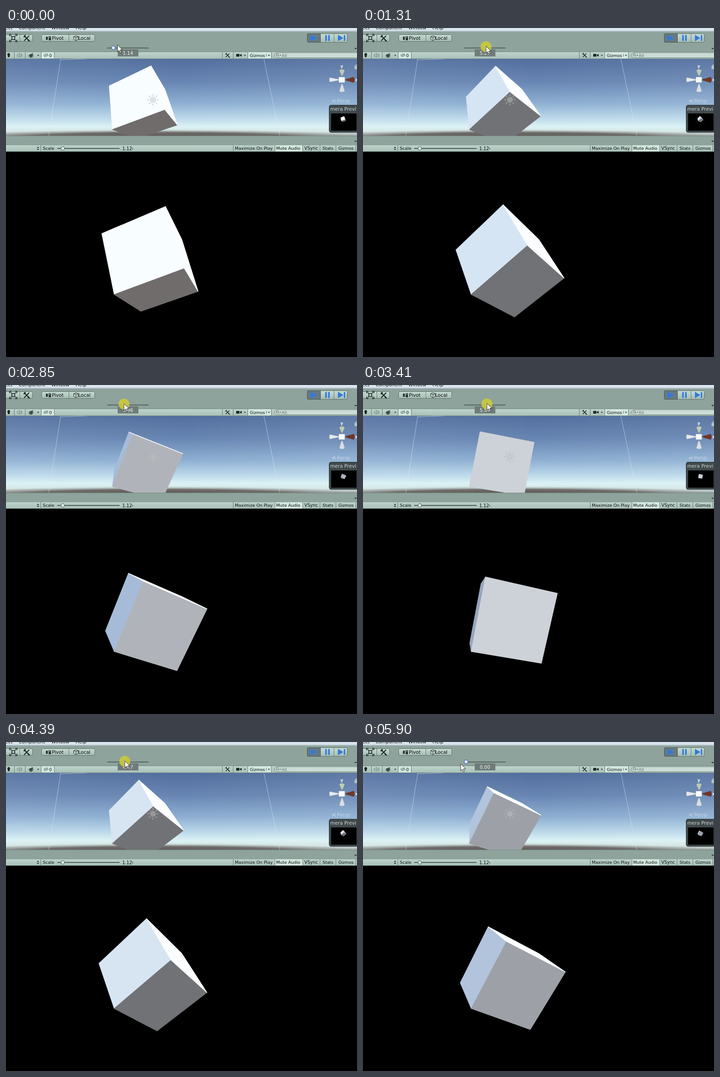
Write an HTML page that moves like this. It is 773 px wide and 724 px high and loops after 5.98 s.

```html
<!DOCTYPE html>
<html lang="en">
<head>
<meta charset="utf-8">
<title>Rotating cube in an editor</title>
<style>
html, body { margin: 0; width: 100%; height: 100%; overflow: hidden; background: #000; }
svg { display: block; width: 773px; height: 724px; }
text { font-family: "DejaVu Sans", Verdana, sans-serif; font-size: 9.4px; fill: #0b0f0e; }
.mid { font-size: 10.6px; }
.sep { stroke: #65776f; stroke-width: 1; fill: none; }
.edge { stroke: #65776f; stroke-opacity: .55; fill: none; }
.btn { fill: url(#button); stroke: #5d6f67; }
.lit { fill: #d3e8df; }
.ray { fill: #b9bbbb; }
polygon { stroke-width: 1.3; stroke-linejoin: round; }
</style>
</head>
<body>
<svg viewBox="0 0 773 724">
  <defs>
    <linearGradient id="button" x2="0" y2="1">
      <stop offset="0" stop-color="#c5dbd2"/><stop offset="1" stop-color="#a5bcb3"/>
    </linearGradient>
    <linearGradient id="strip" x2="0" y2="1">
      <stop offset="0" stop-color="#bdd4cb"/><stop offset="1" stop-color="#a8c0b7"/>
    </linearGradient>
    <linearGradient id="sky" x2="0" y2="1">
      <stop offset="0" stop-color="#526e9d"/><stop offset=".3" stop-color="#6886b3"/>
      <stop offset=".58" stop-color="#8fb0d3"/><stop offset=".76" stop-color="#b9d6e8"/>
      <stop offset=".88" stop-color="#dbf2f5"/><stop offset=".95" stop-color="#d5e5e4"/>
      <stop offset="1" stop-color="#9da5a3"/>
    </linearGradient>
    <linearGradient id="haze">
      <stop offset="0" stop-color="#e4f2f8" stop-opacity=".08"/>
      <stop offset=".5" stop-color="#e4f2f8" stop-opacity="0"/>
      <stop offset="1" stop-color="#e4f2f8" stop-opacity=".08"/>
    </linearGradient>
    <radialGradient id="ground">
      <stop offset="0" stop-color="#5d5755"/><stop offset=".6" stop-color="#6f6b69"/>
      <stop offset="1" stop-color="#a9b3b2" stop-opacity="0"/>
    </radialGradient>
    <clipPath id="sceneClip"><rect y="68" width="773" height="169"/></clipPath>
  </defs>

  <!-- menu and main toolbar -->
  <rect width="773" height="272" fill="#8da39c"/>
  <rect width="773" height="6" fill="#d9e3ee"/>
  <rect y="6" width="773" height="2" fill="#b3c2c6"/>
  <text class="mid" x="-2" y="2.5">ect</text>
  <text style="font-size:10px" x="28" y="2.5">Component</text>
  <text style="font-size:10px" x="100" y="2.5">Window</text>
  <text class="mid" x="153" y="2.5">Help</text>
  <rect class="btn" x="-6.5" y="14.5" width="65" height="15" rx="3"/>
  <path class="sep" d="M30.5 15v14"/>
  <g fill="none" stroke="#18201d" stroke-width="1.6">
    <circle cx="16" cy="22" r="3.5"/>
    <path d="M8 18v-4h4M20 14h4v4M24 26v4h-4M12 30h-4v-4M10 16l4 4M22 16l-4 4M10 28l4-4M22 28l-4-4"/>
    <path d="M40 17l11 11M51 17l-11 11" stroke-width="2"/>
    <path d="M39 20l4-4M48 26l4 3" stroke-width="2.5"/>
  </g>
  <rect class="btn" x="78.5" y="14.5" width="117" height="15" rx="3"/>
  <path class="sep" d="M138.5 15v14"/>
  <path d="M88 19h4v7h-4zM94 18h5v9h-5z" fill="#25302c"/>
  <path d="M96.5 18v4" stroke="#d4e5de"/>
  <path d="M149 19l5-2 5 2v6l-5 3-5-3zM149 19l5 2 5-2M154 21v7" fill="#c1d2cb" stroke="#29332f"/>
  <text class="mid" x="101" y="26">Pivot</text>
  <text style="font-size:10.4px" x="159" y="26">Local</text>
  <rect class="btn" x="663.5" y="12.5" width="88" height="19" rx="3"/>
  <path d="M666 12.5h26.5v19h-26.5q-2.5 0-2.5-3v-13q0-3 2.5-3z" fill="#667981" stroke="#46554f"/>
  <path class="sep" d="M722.5 13v18"/>
  <path d="M671 15l14 7-14 7zM703 15.5h3.5v13h-3.5zM709.5 15.5h3.5v13h-3.5zM731 15l12 7-12 7zM744 15.5h3v13h-3z" fill="#3179dc"/>
  <path d="M767 44h6l-3 3zM767 248h6l-3 3z" fill="#2b3532"/>

  <!-- scene toolbar -->
  <rect y="53" width="773" height="15" fill="url(#strip)"/>
  <rect class="lit" x="78" y="53" width="28" height="14"/>
  <rect class="lit" x="533" y="53" width="51" height="14"/>
  <path class="edge" d="M0 52.5h773M0 67.5h773"/>
  <path class="sep" d="M18.5 53v14M42.5 53v14M77.5 53v14M106.5 53v14M476.5 53v14M500.5 53v14M532.5 53v14M573.5 57v6M584.5 53v14"/>
  <path d="M6 55a3.5 3.5 0 0 1 2 6v3h-4v-3a3.5 3.5 0 0 1 2-6z" fill="#1b2421"/>
  <path d="M25 58h2l3-2.5v9l-3-2.5h-2zM32 57q2 3 0 6M34 56q3 4 0 8" fill="none" stroke="#6d7f78"/>
  <path d="M50 60l5-2.5 5 2.5-5 2.5zM50 62.5l5 2.5 5-2.5M58 55v4M56 57h4" fill="#38443f" stroke="#38443f"/>
  <path d="M69 59h4l-2 3zM524 59h4l-2 3zM577 59h4l-2 3z" fill="#27312e"/>
  <path d="M83 60q5-5 10 0-5 4-10 0zM84 64l8-8" fill="none" stroke="#4d5b55"/>
  <text x="95" y="63.5">0</text>
  <path d="M484 56l8 8M492 56l-8 8M483 58l3-3M490 63l3 2" stroke="#1f2825" stroke-width="1.7"/>
  <path d="M507 57h7v6h-7zM515 59l4-2v6l-4-2z" fill="#1f2825"/>
  <text style="font-size:9px" x="537" y="63.5">Gizmos</text>
  <rect x="591.5" y="54.5" width="190" height="11" rx="5.5" fill="#cadcd5" stroke="#71837c"/>
  <circle cx="597.5" cy="59" r="2.5" fill="none" stroke="#52605a"/>
  <path d="M599 61l2.5 2.5" stroke="#52605a"/>
  <path d="M602 59h4l-2 2.5z" fill="#52605a"/>
  <text x="607" y="63.5" style="fill:#63736c">All</text>

  <!-- scene view -->
  <g clip-path="url(#sceneClip)">
    <rect y="68" width="773" height="169" fill="url(#sky)"/>
    <rect y="68" width="773" height="169" fill="url(#haze)"/>
    <ellipse cx="340" cy="240" rx="480" ry="17" fill="url(#ground)"/>
    <path d="M120.5 68L94 237M568 68L603 237M120 70l58-2" stroke="#dfe8ee" stroke-opacity=".6" fill="none"/>
    <circle cx="96" cy="215" r="2" fill="#eef4f4" opacity=".7"/>
    <g id="sceneCube" transform="translate(.4 .4)"></g>
    <g id="sun" opacity=".45">
      <circle cx="323.5" cy="158" r="6.5" fill="#c2c4c4" stroke="#a9acac"/>
    </g>
  </g>
  <g stroke-width=".5">
    <path d="M734 93q6-4 12 0l-5 12h-2z" fill="#bdccb6" stroke="#8c9c94"/>
    <path d="M713 109q-2 5 0 10l20-4v-2z" fill="#e4e9ec" stroke="#a4adb5"/>
    <path d="M766 108q3 6 0 12l-18-5v-2z" fill="#713728" stroke="#4e2a22"/>
    <path d="M739 123h2l5 16q-6 4-12 0z" fill="#d9dfe2" stroke="#a4adb5"/>
    <path d="M733 108h13v12h-13z" fill="#fafcfc" stroke="#adb8be"/>
  </g>
  <text x="736.5" y="87" style="font-weight:bold;fill:#f4f7f9">y</text>
  <text x="769" y="117" style="font-weight:bold;fill:#f4f7f9">x</text>
  <path d="M768 84h6v6h-6zM770 84v-3h4" fill="#b7c3cc" stroke="#b7c3cc"/>
  <path d="M726 157l-8 3.5 8 3.5M726 160.5h-7" fill="none" stroke="#c3d5e4"/>
  <text style="font-size:10.4px;fill:#c3d5e4" x="729" y="164">Persp</text>
  <rect x="712" y="170" width="70" height="59.5" rx="4" fill="#414a4c" stroke="#2c3436" stroke-width="1.5"/>
  <text class="mid" x="714" y="181.5" style="fill:#cdd5d4">mera Previ</text>
  <rect x="716" y="188" width="56" height="38"/>
  <g id="miniCube" transform="translate(743 200.5) scale(.055) translate(-325 -510)"></g>

  <!-- game view -->
  <rect y="257" width="773" height="15" fill="url(#strip)"/>
  <rect class="lit" x="593" y="257" width="60" height="15"/>
  <path class="edge" d="M0 237.5h773M0 257.5h773"/>
  <path class="sep" d="M76.5 258v13M500.5 258v13M592.5 258v13M653.5 258v13M691.5 258v13M726.5 258v13M770.5 258v13"/>
  <path d="M68 264l2.5-3 2.5 3zM68 266h5l-2.5 3z" fill="#27312e"/>
  <text x="81" y="268">Scale</text>
  <path d="M113 265h137" stroke="#4e5d57" stroke-width="2"/>
  <circle cx="125" cy="265" r="4" fill="#dcebe5" stroke="#4c5a54"/>
  <text style="font-size:9.8px" x="256" y="268.5">1.12</text>
  <path d="M278 264l2 1.5-2 1.5" fill="none" stroke="#25302c"/>
  <text x="504" y="268">Maximize On Play</text>
  <text x="595" y="268">Mute Audio</text>
  <text style="font-size:9.7px" x="657" y="268">VSync</text>
  <text x="697" y="268">Stats</text>
  <text style="font-size:9.1px" x="732" y="268">Gizmos</text>
  <rect y="272" width="773" height="452"/>
  <g id="gameCube" transform="translate(.4 .5)"></g>

  <!-- speed slider, tooltip and pointer -->
  <path d="M223 44h91" stroke="#56645f" stroke-width="2"/>
  <circle id="knob" cy="43.5" r="4" fill="#e9f0fa" stroke="#5570c4" stroke-width="1.5"/>
  <rect x="246" y="47" width="45.5" height="15.5" fill="#6f7b78"/>
  <text id="value" x="268.5" y="58.5" text-anchor="middle" style="font-size:10.4px;fill:#edf2f0"></text>
  <g id="pointer">
    <circle id="press" cy="1" r="12" fill="#cfcb35" fill-opacity=".85"/>
    <path d="M0 0v15l3.5-3 2.5 6 2.5-1-2.5-6h5z" fill="#fff" stroke="#15191a" stroke-width=".9"/>
  </g>
</svg>
<script>
const LOOP = 5980;
const TURN = 10; // degrees per second for each unit of speed
const NS = "http://www.w3.org/2000/svg";
const $ = id => document.getElementById(id);

// [ms, slider value]
const speed = [
  [0, 1.14], [600, 1.5], [1050, 1.7], [1310, 5.3], [1600, 2.4], [2070, 2.05],
  [2200, .4], [2590, .6], [2700, 2.6], [2850, 3.98], [2950, 1.6], [3090, 1.6],
  [3300, 4.6], [3700, 8], [3800, 10], [3980, 10], [4150, 5], [4500, 3.8],
  [4800, 4.6], [4950, 1.4], [5560, 0], [LOOP, 0]
];
const pointerY = [[0, 37], [200, 40], [2070, 40], [2850, 41], [3980, 40], [4800, 43], [5400, 45], [5630, 45.5], [5900, 48], [LOOP, 48]];
const pointerShift = [[0, 9], [250, 0], [5200, 0], [5560, -8], [5900, -12], [LOOP, -12]];
const pressed = t => (t > 150 && t < 3850) || (t > 4150 && t < 5450);

// face colour by its angle around the spin axis
const shades = [
  [0, 112, 108, 108], [24, 113, 114, 118], [41, 135, 138, 146], [49.6, 158, 162, 168],
  [56.5, 177, 181, 187], [85, 225, 230, 236], [120, 248, 254, 255], [144, 214, 229, 243],
  [161, 190, 207, 226], [176, 166, 187, 216], [240, 112, 108, 108], [360, 112, 108, 108]
];

function sample(keys, x) {
  let i = 1;
  while (i < keys.length - 1 && keys[i][0] < x) i++;
  const a = keys[i - 1], b = keys[i];
  const k = (x - a[0]) / (b[0] - a[0]);
  return a.slice(1).map((v, j) => v + (b[j + 1] - v) * k);
}

function angleAt(t) {
  let area = 0;
  for (let i = 1; i < speed.length && speed[i - 1][0] < t; i++) {
    const [t0, v0] = speed[i - 1];
    const end = Math.min(t, speed[i][0]);
    area += (end - t0) * (v0 + sample(speed, end)[0]) / 2;
  }
  return area * TURN / 1000;
}

// homogeneous screen vectors: fixed corner, body diagonal, two spin directions
const gameView = {
  corner: [238, 586, 1], diagonal: [254, 5.5, .272],
  u: [48.5, -87.8, -.145], v: [-80.5, -163, -.0895]
};
const sceneView = {
  corner: [234, 223, 1], diagonal: [280.1, -24.9, .471],
  u: [-16.6, -54.9, -.269], v: [-67, -100.3, -.079]
};

// corners are bit masks over the three edges; near faces carry a shade offset
const faces = [
  { ids: [0, 1, 3, 2], phase: 120 }, { ids: [0, 4, 5, 1], phase: 0 }, { ids: [0, 2, 6, 4], phase: 240 },
  { ids: [1, 5, 7, 3] }, { ids: [2, 3, 7, 6] }, { ids: [4, 6, 7, 5] }
];

function corners(view, angle) {
  const edges = [0, 120, 240].map(offset => {
    const a = (angle + offset) * Math.PI / 180;
    return view.diagonal.map((s, i) => s / 3 + view.u[i] * Math.cos(a) + view.v[i] * Math.sin(a));
  });
  return Array.from({ length: 8 }, (_, mask) => {
    const [x, y, w] = view.corner.map((c, i) =>
      edges.reduce((sum, e, bit) => sum + (mask >> bit & 1) * e[i], c));
    return [x / w, y / w];
  });
}

const facesCamera = pts => pts.reduce((sum, [x, y], i) => {
  const [nx, ny] = pts[(i + 1) % pts.length];
  return sum + x * ny - nx * y;
}, 0) < 0;

function addShape(parent, tag, attrs = {}) {
  const shape = document.createElementNS(NS, tag);
  for (const name in attrs) shape.setAttribute(name, attrs[name]);
  return $(parent).appendChild(shape);
}

function makeCube(id, view) {
  const polys = faces.map(() => addShape(id, "polygon"));
  return angle => {
    const pts = corners(view, angle);
    faces.forEach(({ ids, phase }, i) => {
      const quad = ids.map(n => pts[n]);
      const poly = polys[i];
      poly.style.display = facesCamera(quad) ? "" : "none";
      poly.setAttribute("points", quad.map(p => p.map(n => n.toFixed(2))).join(" "));
      const fill = phase === undefined ? "#fbfdff"
        : `rgb(${sample(shades, (angle + phase) % 360).map(Math.round)})`;
      poly.setAttribute("fill", fill);
      poly.setAttribute("stroke", fill);
    });
  };
}

const cubes = [makeCube("sceneCube", sceneView), makeCube("gameCube", gameView), makeCube("miniCube", gameView)];

for (let i = 0; i < 8; i++) {
  addShape("sun", "path", { class: "ray", d: "M323.5 144l-2.5 5h5z", transform: `rotate(${i * 45} 323.5 158)` });
}

function draw() {
  const t = performance.now() % LOOP;
  const [value] = sample(speed, t);
  const x = 227 + value * 8.3;
  const angle = angleAt(t);
  cubes.forEach(cube => cube(angle));
  $("knob").setAttribute("cx", x);
  $("value").textContent = value.toFixed(2);
  $("pointer").setAttribute("transform", `translate(${x + sample(pointerShift, t)[0]} ${sample(pointerY, t)[0]})`);
  $("press").style.display = pressed(t) ? "" : "none";
  requestAnimationFrame(draw);
}
draw();
</script>
</body>
</html>
```
